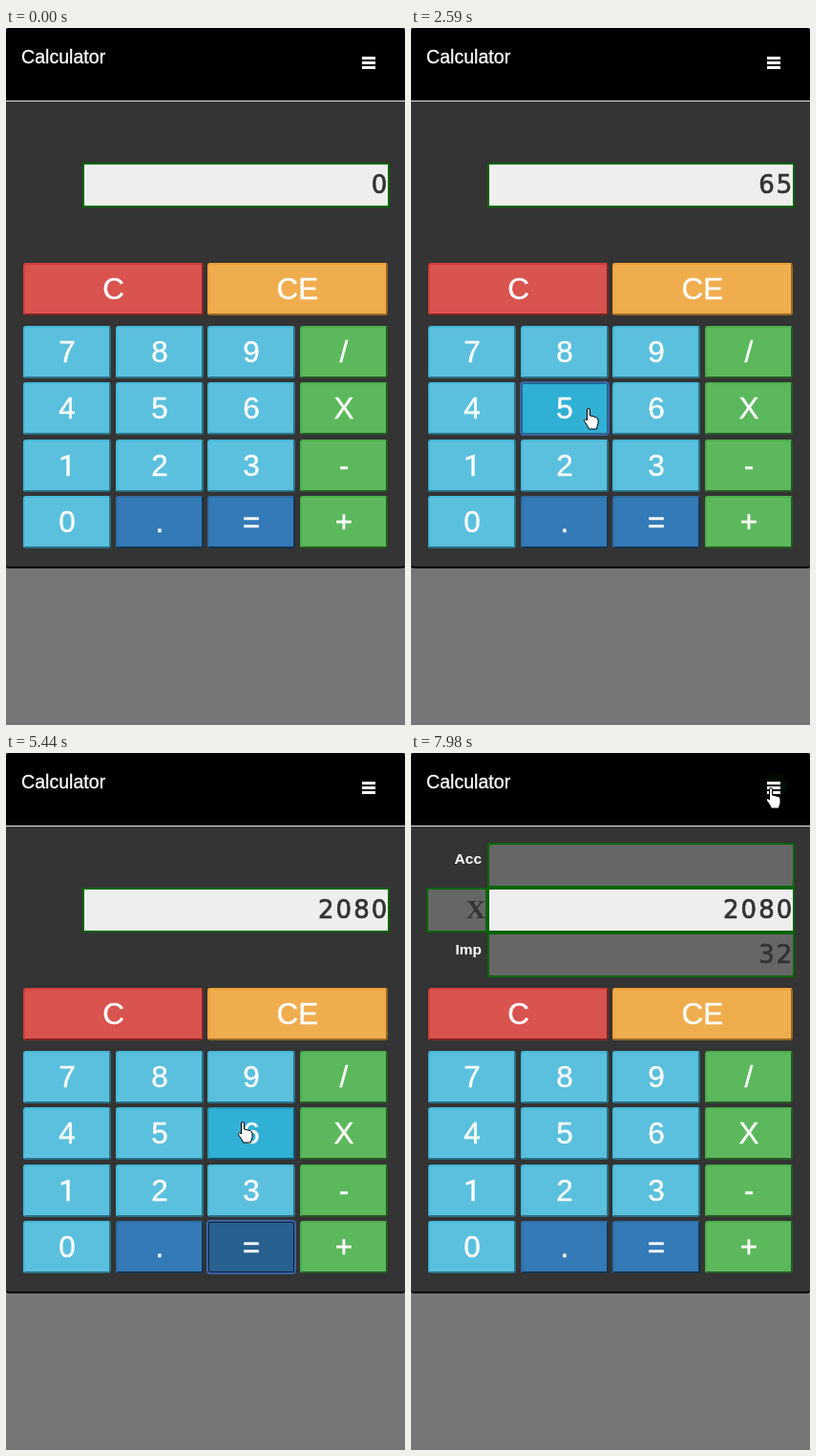
An HTML page that plays this animation: 418x730 px, repeating every 8000 ms.

```html
<!DOCTYPE html>
<html lang="en">
<head>
<meta charset="utf-8">
<title>Calculator</title>
<style>
html, body { margin: 0; height: 100%; overflow: hidden; background: #757776; }
body { position: relative; font-family: "Liberation Sans", Arial, sans-serif; color: #fff; }
div, svg { position: absolute; box-sizing: border-box; white-space: nowrap; }
.app { left: 0; top: 0; width: 418px; height: 566px; background: #333433; border-bottom: 2px solid #000; border-radius: 3px; overflow: hidden; }
.nav { left: 0; top: 0; width: 100%; height: 77px; background: #000; border-bottom: 1px solid #e7e7e7; }
.title { left: 16px; top: 20px; font-size: 19.6px; line-height: 21px; -webkit-text-stroke: .3px; }
#toggle { left: 357px; top: 9px; width: 46px; height: 57px; border: 2px solid transparent; border-radius: 3px; }
#toggle.focus { border-color: #29498c; }
#stain { left: 370px; top: 22px; width: 24px; height: 24px; border-radius: 50%; background: #020d02; }
.bar { left: 373px; width: 14px; height: 3px; background: #fff; }

.key { height: 55px; border: 2px outset var(--edge); border-radius: 3px; background: var(--fill); font-size: 31.5px; line-height: 51px; text-align: center; -webkit-text-stroke: .4px; }
.key[data-name="1"] { font-family: Roboto, sans-serif; } /* a one without a foot */
.danger { --fill: #d9534f; --edge: #d43f3a; --over: #c9302c; --down: #ac2925; }
.warning { --fill: #f0ad4e; --edge: #eea236; --over: #ec971f; --down: #d58512; }
.info { --fill: #5bc0de; --edge: #46b8da; --over: #31b0d5; --down: #269abc; --ring: #1b6d85; }
.success { --fill: #5cb85c; --edge: #4cae4c; --over: #449d44; --down: #398439; --ring: #152c18; }
.primary { --fill: #337ab7; --edge: #2e6da4; --over: #286090; --down: #204d74; --ring: #101f3c; }
.key.hover, .key.focus { background: var(--over); border-color: var(--down); }
.key.focus { border: 2px solid var(--ring); outline: 2px solid #3a62a8; outline-offset: -1px; }
.key.down { background: var(--down); border-color: #14405a; box-shadow: inset 0 3px 5px rgba(0,0,0,.125); }

#extra { left: 0; top: 0; width: 418px; height: 235px; }
.field { left: 80px; width: 322px; height: 47px; border: 2px solid #006400; background: #666; color: #333; text-align: right; font: 26px/42px "DejaVu Sans", sans-serif; letter-spacing: 2.1px; -webkit-text-stroke: .7px; }
.field span { margin-right: -1.5px; }
#main { top: 141px; background: #eee; }
#op { left: 16px; top: 141px; width: 64px; font: bold 28px/42px "Liberation Serif", serif; letter-spacing: 0; -webkit-text-stroke: 0; }
.label { right: 344px; font: bold 15.5px/20px "Liberation Sans", sans-serif; }

#menu { left: 200px; top: 68px; width: 201px; height: 155px; background: #fff; border-radius: 4px; box-shadow: 0 0 0 1px rgba(0,0,0,.15), 0 6px 12px rgba(0,0,0,.175); color: #333; font-size: 15px; line-height: 34px; }
.item { left: 0; width: 201px; height: 36px; padding-left: 43px; letter-spacing: .4px; }
.item.hover { background: #f5f5f5; color: #262626; }
.box { left: 22px; top: 8px; width: 12px; height: 12px; border: 1px solid #8e9499; border-radius: 1px; background: linear-gradient(135deg, #c8ccd0, #f4f4f4); }
.rule { left: 0; top: 99px; width: 201px; height: 1px; background: #e5e5e5; }
#pointer { left: 0; top: 0; width: 418px; height: 730px; overflow: hidden; }
#pointer path { fill: #fff; stroke: #000; stroke-linejoin: round; }
</style>
</head>
<body>
<div class="app">
  <div class="nav">
    <div class="title">Calculator</div>
    <div id="stain"></div>
    <div id="toggle"></div>
    <div class="bar" style="top:30px"></div>
    <div class="bar" style="top:35px"></div>
    <div class="bar" style="top:40px"></div>
  </div>
  <div id="extra">
    <div class="field" style="top:94px"></div>
    <div class="field" id="op">X</div>
    <div class="field" style="top:188px"><span>32</span></div>
    <div class="label" style="top:101px">Acc</div>
    <div class="label" style="top:196px">Imp</div>
  </div>
  <div class="field" id="main"><span id="value">0</span></div>
</div>
<div id="menu">
  <div class="item" id="expand" style="top:5px">Expanded Displays<div class="box"></div></div>
  <div class="item" style="top:41px">History Log<div class="box"></div></div>
  <div class="rule"></div>
  <div class="item" style="top:119px;padding-left:21px;letter-spacing:0">Perform Self-Test</div>
</div>
<svg id="pointer">
  <circle id="spot" r="12" fill="#ff0" opacity=".5"/>
  <path id="hand" d="M4.5 13V2a1.5 1.5 0 0 1 3 0v6l6 1.5q2.5.5 2.5 3v4q-1 2-1.5 5.5h-8q-1-3-4.5-7.5q-1.5-2 .5-2.7q1.3-.2 2 1.2z"/>
  <path id="arrow" d="M.5.5v16l4-3.5 2.5 5.5 2.5-1-2.5-5.5h5z"/>
</svg>
<script>
const $ = id => document.getElementById(id);
const app = document.querySelector('.app');
const LOOP = 8000, START = 578, STEP = 77;   // the picture advances in steps of 77 ms

const keys = [];
function addKey(name, kind, x, y, w) {
  const el = document.createElement('div');
  el.className = 'key ' + kind;
  el.dataset.name = el.textContent = name;
  Object.assign(el.style, { left: x + 'px', top: y + 'px', width: w + 'px' });
  app.append(el);
  keys.push({ name, el, x, y, w, h: 55 });
}
addKey('C', 'danger', 18, 246, 189);
addKey('CE', 'warning', 211, 246, 189);
const columns = [18, 115, 211, 308], rows = [312, 371, 431, 490];
['789/', '456X', '123-', '0.=+'].forEach((row, r) => [...row].forEach((name, c) => {
  const kind = c === 3 ? 'success' : '.='.includes(name) ? 'primary' : 'info';
  addKey(name, kind, columns[c], rows[r], 92);
}));

const toggle = { x: 357, y: 9, w: 46, h: 57 };
const expand = { x: 200, y: 73, w: 201, h: 36 };

// Pointer stops: step, x, y
const path = [
  [0, 316, 708], [6, 285, 285], [7, 280, 280], [10, 249, 384], [11, 249, 384], [13, 250, 390],
  [18, 250, 390], [23, 155, 398], [25, 155, 398], [29, 345, 397], [31, 345, 397], [34, 256, 452],
  [37, 256, 452], [43, 156, 457], [47, 156, 457], [55, 254, 515], [58, 254, 515], [63, 247, 386],
  [66, 360, 190], [67, 405, 110], [69, 377, 39], [78, 377, 39], [83, 311, 78], [84, 308, 84],
  [88, 301, 89], [89, 301, 89], [96, 376, 36]
];
const presses = [24, 30, 36, 45, 56, 70, 85];
// Step, displayed value, focused control
const states = [
  [-Infinity, '0', ''], [17, '6', '6'], [24, '6', '5'], [25, '65', '5'], [30, '65', 'X'], [31, '0', 'X'],
  [36, '0', '3'], [37, '3', '3'], [45, '3', '2'], [46, '32', '2'], [56, '32', '='], [57, '2080', '='],
  [70, '2080', 'toggle'], [86, '2080', '']
];

function pointerAt(k) {
  const i = path.findIndex(p => p[0] > k);
  if (i < 0) return path[path.length - 1].slice(1);
  const [k0, x0, y0] = path[Math.max(i - 1, 0)], [k1, x1, y1] = path[i];
  const u = Math.max(0, (k - k0) / (k1 - k0)), e = u * u * (3 - 2 * u);
  return [Math.round(x0 + (x1 - x0) * e), Math.round(y0 + (y1 - y0) * e)];
}

const show = (el, on) => el.style.display = on ? '' : 'none';

function render(ms) {
  const k = Math.floor((ms - START) / STEP);
  const [x, y] = pointerAt(k);
  const [, value, focus] = states.filter(s => s[0] <= k).pop();
  const visible = k >= 0, pressed = presses.includes(k);
  const over = r => visible && x >= r.x && x < r.x + r.w && y >= r.y && y < r.y + r.h;

  for (const key of keys) {
    const hover = over(key), { classList } = key.el;
    classList.toggle('hover', hover);
    classList.toggle('focus', focus === key.name);
    classList.toggle('down', hover && pressed);
  }
  $('value').textContent = value;
  $('toggle').classList.toggle('focus', focus === 'toggle');
  $('expand').classList.toggle('hover', over(expand));
  show($('menu'), k >= 71 && k < 86);
  show($('extra'), k >= 86);
  show($('stain'), k >= 71);

  const hand = over(toggle) || keys.some(over);
  show($('hand'), visible && hand);
  show($('arrow'), visible && !hand);
  show($('spot'), pressed);
  $('hand').setAttribute('transform', `translate(${x - 5} ${y})`);
  $('arrow').setAttribute('transform', `translate(${x} ${y})`);
  $('spot').setAttribute('transform', `translate(${x - 1} ${y + 1})`);
}

const begin = performance.now();
function frame() {
  render((performance.now() - begin) % LOOP);
  requestAnimationFrame(frame);
}
frame();
</script>
</body>
</html>
```
